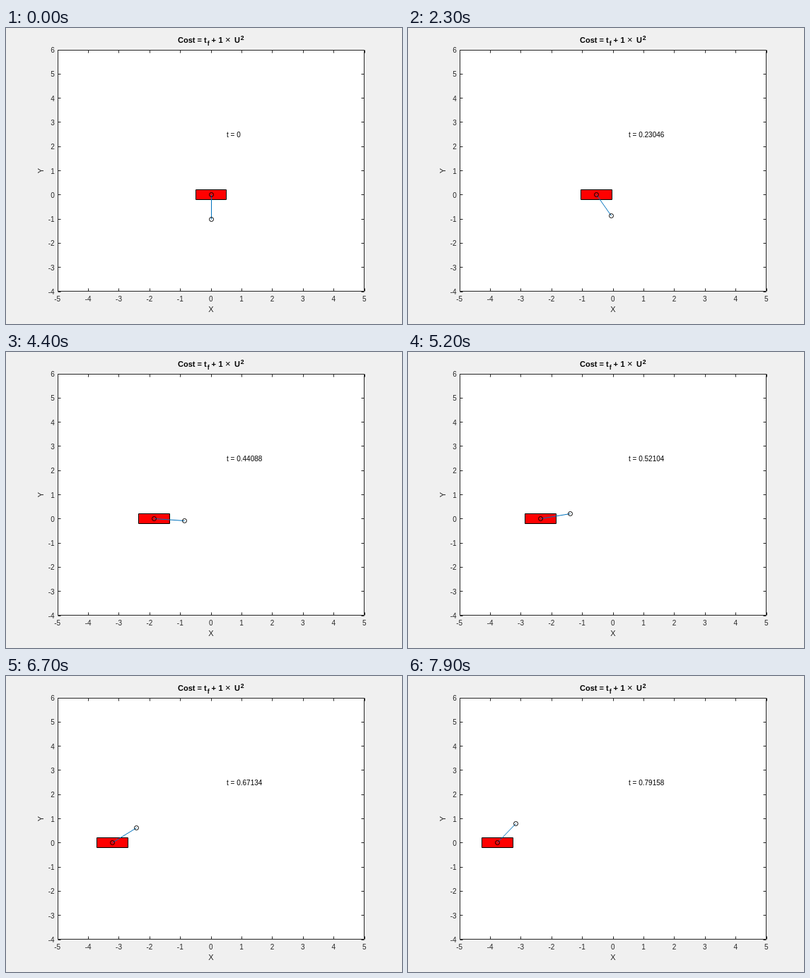
An HTML page that plays this animation: 560 by 420 pixels, repeating every 8000 ms.

```html
<!DOCTYPE html>
<html>
<head>
<meta charset="utf-8">
<style>
html, body { margin: 0; width: 100%; height: 100%; overflow: hidden; background: #f0f0f0; }
svg { display: block; }
text { font-family: "Liberation Sans", Arial, sans-serif; font-size: 10px; fill: #262626; }
.title text { font-size: 11px; font-weight: bold; fill: #000; }
.title .small { font-size: 8.8px; }
.title .times { font-size: 13px; font-weight: normal; }
text.axis { font-size: 11px; text-anchor: middle; }
#clock { fill: #000; }
</style>
</head>
<body>
<svg width="560" height="420" viewBox="0 0 560 420">
  <rect x="73.5" y="31.5" width="433" height="342" fill="#fff"/>
  <path id="ticks" fill="none" stroke="#262626"/>
  <g id="labels"></g>
  <g class="title">
    <text x="243" y="21">Cost = t</text>
    <text class="small" x="284.7" y="25">f</text>
    <text x="290.5" y="21">+</text>
    <text x="300.5" y="21">1</text>
    <text class="times" x="310" y="21">×</text>
    <text x="323" y="21">U</text>
    <text class="small" x="331.7" y="17">2</text>
  </g>
  <text class="axis" x="290" y="403">X</text>
  <text class="axis" transform="translate(53 202.5) rotate(-90)">Y</text>
  <text id="clock" x="312" y="155"></text>
  <path id="cart" fill="#f00" stroke="#000"/>
  <path id="rod" stroke="#0072bd"/>
  <g fill="none" stroke="#000">
    <circle id="pivot" r="3"/>
    <circle id="bob" r="3"/>
  </g>
</svg>
<script>
const $ = id => document.getElementById(id);
const snap = p => Math.floor(p) + .5;
const px = x => 290 + 43.4 * x;
const py = y => 236.8 - 34.3 * y;

// Axes box with inward ticks on all four sides
let ticks = 'M73.5 31.5H506.5V373.5H73.5Z', labels = '';
for (let v = -5; v <= 6; v++) {
  if (v <= 5) {
    ticks += `M${snap(px(v))} 373.5v-4m0 -338v4`;
    labels += `<text x="${px(v) - .3}" y="388" text-anchor="middle">${v}</text>`;
  }
  if (v >= -4) {
    ticks += `M73.5 ${snap(py(v))}h4m429 0h-4`;
    labels += `<text x="68.7" y="${Math.round(py(v) + 4)}" text-anchor="end">${v}</text>`;
  }
}
$('ticks').setAttribute('d', ticks);
$('labels').innerHTML = labels;

// Seconds, cart position, rod angle from straight down; outer rows only set end slopes
const keys = [
  [-.9, -.077, .075], [0, 0, 0], [.9, -.077, .075], [1.3, -.155, .152],
  [1.8, -.313, .3], [2.7, -.755, .695], [3.2, -1.05, .952], [3.6, -1.325, 1.142],
  [4.4, -1.855, 1.491], [5.2, -2.366, 1.787], [6.7, -3.215, 2.23],
  [7.9, -3.767, 2.501], [9.1, -4.2, 2.7]
];

function slope(i, k) {
  const [a, b, c] = [keys[i - 1], keys[i], keys[i + 1]];
  const h = b[0] - a[0], g = c[0] - b[0];
  return ((b[k] - a[k]) / h * g + (c[k] - b[k]) / g * h) / (h + g);
}

function curve(s, k) {
  let i = 1;
  while (i < keys.length - 3 && s > keys[i + 1][0]) i++;
  const a = keys[i], b = keys[i + 1], h = b[0] - a[0], u = (s - a[0]) / h, w = 1 - u;
  return w * w * ((1 + 2 * u) * a[k] + u * h * slope(i, k))
       + u * u * ((1 + 2 * w) * b[k] - w * h * slope(i + 1, k));
}

function place(id, x, y) {
  $(id).setAttribute('cx', x);
  $(id).setAttribute('cy', y);
}

function draw(now) {
  const step = Math.floor(now / 100) % 80, s = step / 10;
  const x = curve(s, 1), angle = curve(s, 2);
  const x0 = snap(px(x)), y0 = snap(py(0));
  const x1 = snap(px(x + Math.sin(angle))), y1 = snap(py(-Math.cos(angle)));
  const left = snap(px(x - .5)), right = snap(px(x + .5));
  $('cart').setAttribute('d', `M${left} ${snap(py(.2))}H${right}V${snap(py(-.2))}H${left}Z`);
  $('rod').setAttribute('d', `M${x0} ${y0}L${x1} ${y1}`);
  place('pivot', x0, y0);
  place('bob', x1, y1);
  $('clock').textContent = 't = ' + +(step * .01002).toFixed(5);
}

let start;
function tick(now) {
  start ??= now;
  draw(now - start);
  requestAnimationFrame(tick);
}
draw(0);
requestAnimationFrame(tick);
</script>
</body>
</html>
```
